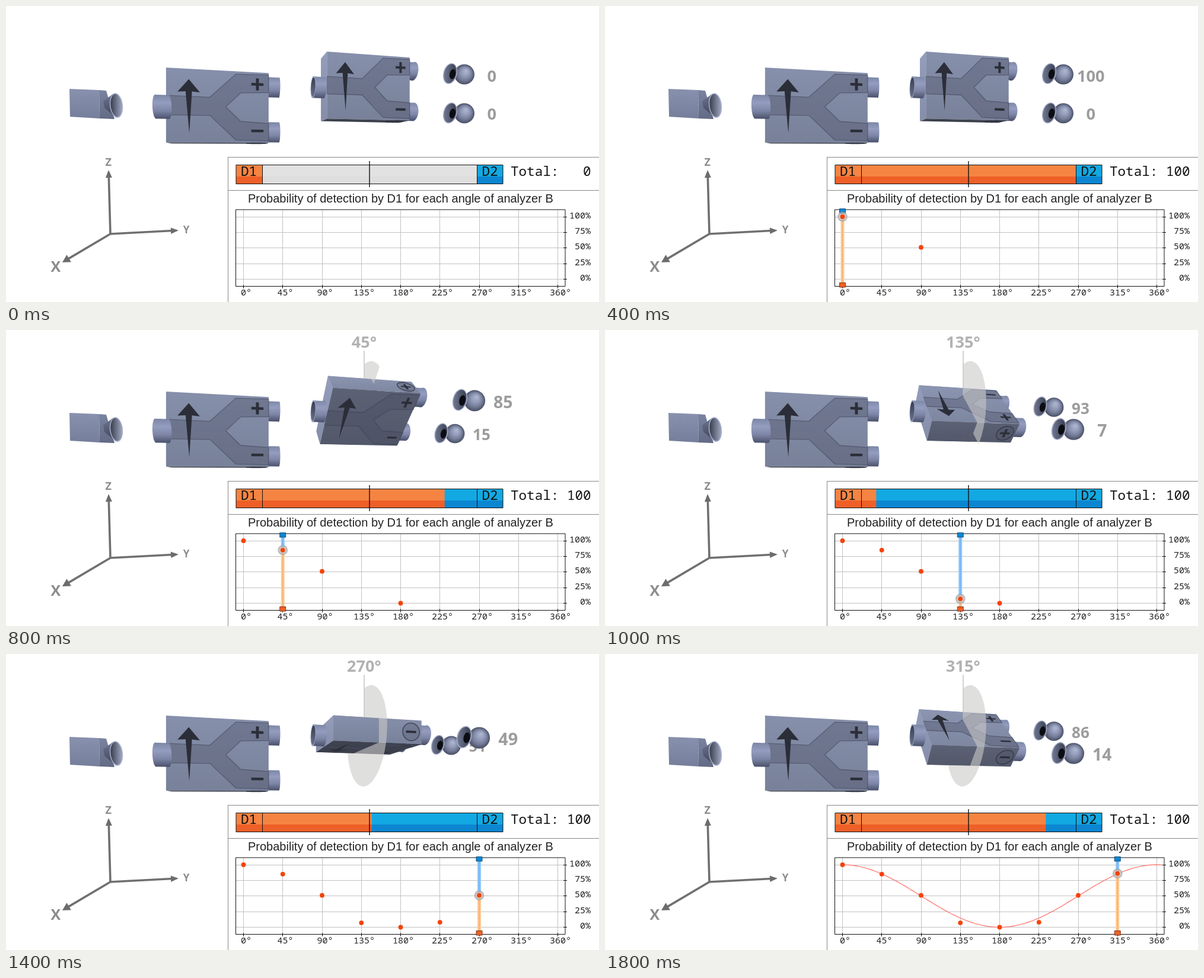
Recreate the animation shown at these times as an HTML page with a canvas. Size 1000 by 500 pixels, loop 2000 ms.

```html
<!DOCTYPE html>
<html lang="en">
<head>
<meta charset="utf-8">
<title>Spin analyzers</title>
<style>
html, body { margin: 0; width: 100%; height: 100%; overflow: hidden; background: #fff; }
canvas { display: block; width: 1000px; height: 500px; }
</style>
</head>
<body>
<canvas id="stage" width="1000" height="500"></canvas>
<script>
const g = document.getElementById('stage').getContext('2d');
const STEP = 200, STEPS = 10, TAU = Math.PI * 2;
const RUNS = [[90, 51], [0, 100], [180, 0], [45, 85], [135, 7], [225, 8], [270, 51], [315, 86]];
const SANS = '"Open Sans", "Noto Sans", sans-serif';
const MONO = '"Noto Sans Mono", monospace';
const INK = '#2b2e38';
const DEPTH = .35, PORT = .67, DIAL = 1.56;
const METAL = ['#7c86a6', '#949dbf', '#7d86a6', '#4b526d'];

const rad = deg => deg * TAU / 360;

// Perspective of a point: x along the beam, u up, n towards the viewer.
function proj(x, u, n) {
  const w = 1 + .03 * x - .1 * n;
  return [605.5 + (67.5 * x + 21 * n) / w, 141 + (3 * x - 53 * u - 11 * n) / w, w];
}
function ring(x, u, n, r) {
  return Array.from({ length: 40 }, (_, i) =>
    proj(x, u + r * Math.cos(i / 40 * TAU), n + r * Math.sin(i / 40 * TAU)));
}

function trace(pts) {
  g.beginPath();
  pts.forEach(p => g.lineTo(p[0], p[1]));
}
function poly(pts, fill, stroke, w = 1) {
  trace(pts);
  g.closePath();
  g.fillStyle = fill;
  g.fill();
  if (!stroke) return;
  g.strokeStyle = stroke;
  g.lineWidth = w;
  g.stroke();
}
function curve(pts, color, w = 1) {
  trace(pts);
  g.strokeStyle = color;
  g.lineWidth = w;
  g.stroke();
}
function line(x0, y0, x1, y1, color, w) {
  curve([[x0, y0], [x1, y1]], color, w);
}
function rect(x, y, w, h, fill, stroke) {
  poly([[x, y], [x + w, y], [x + w, y + h], [x, y + h]], fill, stroke);
}
function oval(x, y, rx, ry, fill, tilt = 0) {
  g.beginPath();
  g.ellipse(x, y, rx, ry, tilt, 0, TAU);
  g.fillStyle = fill;
  g.fill();
}
function text(s, x, y, font, fill, align = 'center') {
  g.font = font;
  g.fillStyle = fill;
  g.textAlign = align;
  g.fillText(s, x, y);
}
function label(s, x, y, size, fill) {
  text(s, x, y + size * .36, `bold ${size}px ${SANS}`, fill);
}
function ramp(x0, y0, x1, y1, ...colors) {
  const r = g.createLinearGradient(x0, y0, x1, y1);
  colors.forEach((c, i) => r.addColorStop(i / (colors.length - 1), c));
  return r;
}
function tone(k) {
  return `rgb(${[128, 137, 163].map(c => Math.round(c * k))})`;
}

// A box that turns about the beam; a runs along its arrow, b along its thickness.
function makeBox(x, u, angle) {
  const s = Math.sin(rad(angle)), c = Math.cos(rad(angle));
  const pos = (dx, a, b) => [x + dx, u + a * c - b * s, a * s + b * c];
  return { s, c, pos, at: (...p) => proj(...pos(...p)) };
}
function lit(up) {
  return 1 + .25 * up - .28 * up * up;
}
function area(pts) {
  return pts.reduce((sum, p, i) => {
    const q = pts[(i + 1) % pts.length];
    return sum + p[0] * q[1] - q[0] * p[1];
  }, 0);
}
function visibleFaces(box, end = 1) {
  const list = [];
  for (const k of [1, -1]) {
    const d = k * DEPTH;
    list.push({ k, wide: true, light: lit(-k * box.s),
      pts: [[-1, k, d], [end, k, d], [end, -k, d], [-1, -k, d]] });
    list.push({ k, edge: true, light: lit(k * box.c),
      pts: [[-1, k, -d], [end, k, -d], [end, k, d], [-1, k, d]] });
  }
  list.push({ light: 1.1, pts: [[-1, 1, -DEPTH], [-1, 1, DEPTH], [-1, -1, DEPTH], [-1, -1, -DEPTH]] });
  list.forEach(f => f.pts = f.pts.map(p => box.at(...p)));
  return list.filter(f => area(f.pts) > 0);
}

const HALF = [[-1, .26], [-.18, .25], [.33, .92], [1, .94], [1, .44], [.43, .4], [.13, 0]];
const FORK = HALF.concat(HALF.slice(0, -1).reverse().map(([x, a]) => [x, -a]));
const ARROW = [[-.58, .72], [-.37, .37], [-.52, .39], [-.57, -.74], [-.64, .39], [-.79, .37]];

function sign(put, x, y, plus, dx, dy) {
  const bar = (w, h) => poly([put(x - w, y - h), put(x + w, y - h), put(x + w, y + h), put(x - w, y + h)], INK);
  bar(dx, dy * .22);
  if (plus) bar(dx * .24, dy);
}
function fork(put) {
  poly(FORK.map(p => put(...p)), 'rgba(70,75,95,.33)', 'rgba(55,60,80,.5)', 1.3);
  poly(ARROW.map(p => put(...p)), INK);
  for (const k of [1, -1]) sign(put, .768, k * .66, k > 0, .124, .17);
}
function badge(put, plus) {
  const pts = Array.from({ length: 40 }, (_, i) =>
    put(.75 + .2 * Math.cos(i / 40 * TAU), .26 * Math.sin(i / 40 * TAU)));
  poly(pts, 'rgba(70,75,95,.25)', 'rgba(45,48,62,.8)', 1.4);
  sign(put, .75, 0, plus, .12, .15);
}
function tube(box, x0, x1, a, r) {
  const from = box.pos(x0, a, 0), to = box.pos(x1, a, 0);
  const side = ([x, u, n], k) => proj(x, u + k * r, n);
  const top = side(from, 1), low = side(from, -1);
  const shade = ramp(0, top[1], 0, low[1], ...METAL);
  poly([top, side(to, 1), side(to, -1), low], shade);
  poly(ring(...to, r), shade);
  const mouth = ring(...from, r);
  poly(mouth, shade);
  if (area(mouth) > 0) {
    poly(mouth, '#a3accb');
    poly(ring(...from, r * .88), ramp(0, top[1], 0, low[1], '#343a4c', '#6b738e'));
  }
}
function body(box) {
  for (const f of visibleFaces(box)) {
    const ys = f.pts.map(p => p[1]);
    poly(f.pts, ramp(0, Math.min(...ys), 0, Math.max(...ys), tone(f.light * 1.05), tone(f.light * .94)));
    if (f.wide) fork((x, a) => box.at(x, a, f.k * DEPTH));
    if (f.edge) badge((x, b) => box.at(x, f.k, b), f.k > 0);
  }
}
function analyzer(box, angle) {
  for (const k of box.s > 0 ? [-1, 1] : [1, -1]) tube(box, .9, 1.25, k * PORT, .3);
  body(box);
  if (angle) {
    dial(angle);
    // The near half of the box covers the dial again.
    g.save();
    g.beginPath();
    for (const f of visibleFaces(box, 0)) {
      f.pts.forEach((p, i) => i ? g.lineTo(p[0], p[1]) : g.moveTo(p[0], p[1]));
      g.closePath();
    }
    g.clip();
    body(box);
    g.restore();
  }
  tube(box, -1.25, -1, 0, .33);
}
function dial(angle) {
  label(angle + '°', 604, 20, 27, '#b2b2b2');
  line(604, 35, 604, 139, '#b5b5b5', 1.2);
  const pts = [proj(-.02, 0, 0)];
  for (let a = 0; a <= angle; a += 3) {
    pts.push(proj(-.02, DIAL * Math.cos(rad(a)), DIAL * Math.sin(rad(a))));
  }
  poly(pts, 'rgba(202,202,200,.6)');
}

function detector(box, k, count) {
  const [x, y, w] = box.at(2.27, k * PORT, 0);
  const [bx, by] = box.at(2.68, k * PORT, 0);
  const [tx, ty, tw] = box.at(3.5, k * PORT, 0);
  const z = 1.07 / w, r = 17 * z;
  const ball = g.createRadialGradient(bx + 3 * z, by - 6 * z, 1, bx, by, r);
  ['#adb5d0', '#949dba', '#757d99', '#484e64'].forEach((c, i) => ball.addColorStop(i / 3, c));
  oval(bx, by, r, r, ball);
  oval(x, y, 11.5 * z, 18 * z, '#a8b0ca', .25);
  oval(x, y, 10 * z, 16.5 * z, ramp(x - 10, y, x + 10, y, '#6d758e', '#3b4052'), .25);
  oval(x + 4 * z, y + z, 5 * z, 8.5 * z, '#0c0d12', .2);
  label(count, tx, ty, 30 / tw, 'rgba(90,90,90,.6)');
}

function source() {
  poly([[107, 140], [157, 142], [158, 190], [108, 187]], ramp(0, 140, 0, 190, '#8891ad', '#757e9a'));
  poly([[157, 142], [169, 143], [183, 191], [158, 190]], ramp(0, 142, 0, 191, '#7a839f', '#626a85'));
  poly([[164, 161], [181, 148], [186, 189], [166, 172]], ramp(0, 148, 0, 188, '#6d7590', '#3f4559'));
  oval(186, 168, 11, 21, '#aab2cd', -.12);
  oval(186, 168, 9.5, 19.3, ramp(177, 0, 196, 0, '#3d4252', '#a0a8c0'), -.12);
}
function axis(name, dx, dy, size) {
  const len = Math.hypot(dx, dy), ux = dx / len, uy = dy / len;
  const put = (along, side) => [176 + ux * along - uy * side, 385 + uy * along + ux * side];
  const w = size / 4;
  curve([[176, 385], put(len - 10, 0)], '#707070', 3.6);
  poly([put(len, 0), put(len - 13, w + 1), put(len - 13, -w - 1)], '#6c6c6c');
  label(name, ...put(len + 13, 0), size, '#8c8c8c');
}

function twoTone(x, w, top, bottom) {
  rect(x, 268, w, 20, top);
  rect(x, 288, w, 13, bottom);
}
function meter(hits) {
  const hot = ['#f58442', '#ef5f28'], cold = ['#12a8e2', '#0c86d1'];
  if (hits === undefined) twoTone(432, 362, '#e2e2e2', '#dedede');
  else {
    twoTone(432, 362, ...cold);
    twoTone(432, 3.62 * hits, ...hot);
  }
  twoTone(388, 44, ...hot);
  twoTone(794, 44, ...cold);
  rect(388, 268.5, 450, 32, 'transparent', '#111');
  line(432.5, 268, 432.5, 301, '#111');
  line(794.5, 268, 794.5, 301, '#111');
  line(613, 262, 613, 306, '#111', 1.4);
  const font = `22.6px ${MONO}`;
  text('D1', 409.5, 287, font, '#111');
  text('D2', 816, 287, font, '#111');
  text('Total:' + String(hits === undefined ? 0 : 100).padStart(4), 851, 287, font, '#111', 'left');
}

const px = a => 400.5 + a * 66.25 / 45;
const py = v => 461.5 - v * 1.055;

function marker(x, y) {
  const beam = (y0, y1, wide, core) => {
    line(x, y0, x, y1, wide, 6);
    line(x, y0, x, y1, core, 1.5);
  };
  beam(346, y, '#92c8ff', '#6fb0f5');
  if (y < py(0)) beam(y, 471, '#ffcb96', '#f2ae70');
  rect(x - 5, 342.5, 10, 7.5, '#0e86d2', '#17527c');
  rect(x - 5, 467.5, 10, 7.5, '#ee6026', '#7d3a1c');
  oval(x, y, 8.5, 8.5, 'rgba(170,170,170,.75)');
  oval(x, y, 5.3, 5.3, '#d9d2cc');
}
function chart(runs, fitted) {
  text('Probability of detection by D1 for each angle of analyzer B', 408, 332,
    '20px "Liberation Sans", Arial, sans-serif', '#222', 'left');
  for (let i = 0; i <= 8; i++) {
    const x = Math.floor(px(i * 45)) + .5;
    line(x, 344, x, 473, '#c2c2c2');
    line(x, 471, x, 477, '#111');
    text(i * 45 + '°', x + 4.5, 489, `15px ${MONO}`, '#222');
  }
  for (let v = 0; v <= 100; v += 25) {
    const y = Math.floor(py(v)) + .5;
    line(388, y, 943, y, '#c2c2c2');
    line(940, y, 946, y, '#111');
    text(v + '%', 986, y + 2, `15px ${MONO}`, '#222', 'right');
  }
  rect(387.5, 344, 555.5, 129.5, 'transparent', '#111');

  if (fitted) {
    const pts = [];
    for (let a = 0; a <= 366; a += 2) pts.push([px(a), py(100 * Math.cos(rad(a / 2)) ** 2)]);
    curve(pts, '#ff7f78', 1.4);
  }
  const dots = runs.map(([a, hits]) => [px(a), py(hits)]);
  if (dots.length) marker(...dots[dots.length - 1]);
  dots.forEach(([x, y]) => oval(x, y, 3.9, 3.9, '#f4430b'));
}

function draw(step) {
  const runs = RUNS.slice(0, step);
  const [angle, hits] = runs[runs.length - 1] || [0];
  const box = makeBox(0, 0, angle);
  g.fillStyle = '#fff';
  g.fillRect(0, 0, 1000, 500);

  source();
  analyzer(makeBox(-3.27, -.73, 0), 0);
  analyzer(box, angle);
  for (const k of box.s > 0 ? [-1, 1] : [1, -1]) {
    detector(box, k, hits === undefined ? 0 : k > 0 ? hits : 100 - hits);
  }

  axis('Z', -3, -108, 18);
  axis('Y', 115, -6, 17);
  axis('X', -81, 48, 25);

  line(374.5, 255, 374.5, 500, '#888');
  line(374, 255.5, 1000, 255.5, '#888');
  line(374, 311.5, 1000, 311.5, '#888');
  meter(hits);
  chart(runs, step === STEPS - 1);
}

const start = performance.now();
function tick() {
  const t = Math.max(0, performance.now() - start);
  draw(Math.floor(t / STEP) % STEPS);
  requestAnimationFrame(tick);
}
tick();
</script>
</body>
</html>
```
